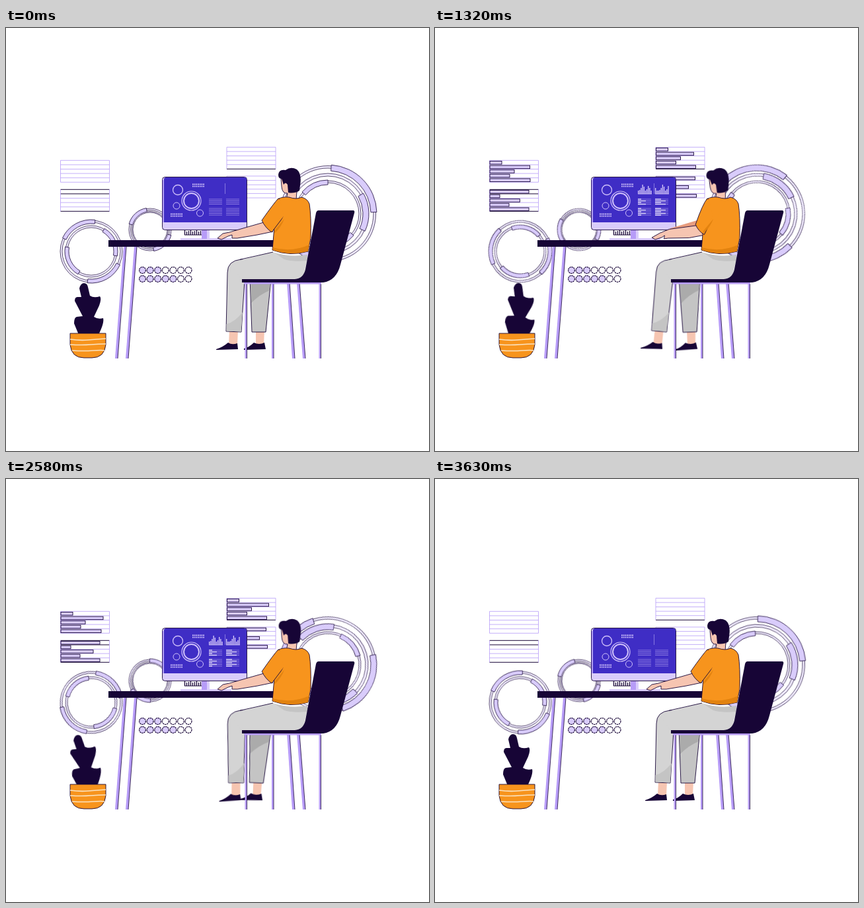
Animation, 640 px wide and 640 px high, one loop 3.66 s. Source, as an HTML page:

```html
<!DOCTYPE html>
<html lang="en">
<head>
<meta charset="utf-8">
<title>Working at the desk</title>
<style>
html, body { margin: 0; width: 100%; height: 100%; overflow: hidden; background: #fff; }
svg { display: block; width: 100vw; height: 100vh; }
.line { stroke: #170536; stroke-width: .9; }
.lilac { fill: #d9ccfb; }
.violet { fill: #b79cf8; }
.dark { fill: #170536; }
.skin { fill: #f6c5b1; }
.orange { fill: #f7941d; }
.shade { fill: #e2820f; }
.spin, .sway, .front, .rear, .head, .arm, .far, .sleeve {
  animation: 3660ms ease-in-out infinite;
}
.spin { animation-name: spin; animation-timing-function: linear; }
.sway { animation-name: sway; transform-origin: 125px 475px; }
.front { animation-name: front; transform-origin: 352px 362px; }
.rear { animation-name: rear; transform-origin: 386px 380px; }
.head { animation-name: head; transform-origin: 433px 256px; }
.arm { animation-name: arm; }
.far { animation-name: far; }
.sleeve { animation-name: sleeve; }
@keyframes spin { to { transform: rotate(360deg); } }
@keyframes sway {
  0%, 100% { transform: rotate(0deg); }
  25% { transform: rotate(7deg); }
  75% { transform: rotate(-6.5deg); }
}
@keyframes front {
  0%, 100% { transform: rotate(0deg); }
  25% { transform: rotate(6deg); }
  49% { transform: rotate(-.4deg); }
  75% { transform: rotate(-2.2deg); }
}
@keyframes rear {
  0%, 100% { transform: rotate(0deg); }
  25% { transform: rotate(-4.4deg); }
  49% { transform: rotate(.5deg); }
  75% { transform: rotate(2.8deg); }
}
@keyframes head {
  0%, 100% { transform: rotate(0deg); }
  25% { transform: rotate(-3deg); }
  75% { transform: rotate(1deg); }
}
@keyframes arm {
  0%, 75%, 100% { d: path("M390 294L338 309L328 311L320 318L326 320L336 315L342 313L342 318L350 318L380 313L404 308Z"); }
  25% { d: path("M399 299L356 304L342 310L329 317L334 320L344 317L348 314L347 319L353 318L385 318L407 314Z"); }
}
@keyframes far {
  0%, 75%, 100% { d: path("M392 294L350 306L352 308L400 300Z"); }
  25% { d: path("M399 290L356 303L358 306L404 300Z"); }
}
@keyframes sleeve {
  0%, 75%, 100% { d: path("M412 258Q406 264 387 291Q392 302 402 309L421 284L428 264Z"); }
  25% { d: path("M412 258Q405 266 395 298Q399 308 408 313L420 288L428 264Z"); }
}
</style>
</head>
<body>
<svg viewBox="0 0 640 640">
  <g id="rings" fill="none"></g>
  <g id="panels"></g>
  <g id="dots"></g>

  <g id="table"></g>
  <path class="dark" d="M155 321H408V331H155Z"/>

  <path class="sway dark" d="M110 464L103 447Q103 438 107 437L116 436L104 413Q104 407 108 407L114 407L111 394Q113 386 118 386Q123 386 124 392L127 405Q133 409 142 406Q145 409 141 420L133 437Q139 441 147 439Q149 446 140 464Z"/>
  <path class="orange line" d="M97 462H151V479Q149 499 130 499H118Q99 499 97 479Z"/>
  <path d="M97 471Q112 473 124 472T151 470M97 479Q115 480 128 479T151 478M100 488Q118 489 132 488T149 488" fill="none" stroke="#fbe3c0" stroke-width="1.7"/>

  <g id="keys"></g>
  <path class="lilac" d="M264 318H341V321H264Z"/>
  <path class="violet" d="M296 305H308V319H296Z"/>
  <path class="lilac" d="M304 305H308V319H304Z"/>
  <rect class="lilac line" x="236.5" y="225.5" width="128" height="80" rx="4"/>
  <path d="M239 294V229Q239 226 242 226H361Q364 226 364 229V294Z" fill="#3f2dc5"/>
  <path d="M237.5 230V294" stroke="#8d75ea" stroke-width="1.5"/>
  <g id="screen" stroke="#cfc0fa" fill="none"></g>

  <g class="rear">
    <path class="skin" d="M378 457H391L390 479H378Z"/>
    <path class="dark" d="M360 485Q368 483 375 476Q383 480 391 476L393 486L360 487Z"/>
    <path class="line" d="M369 378H401L400 390L393 460H372Z" fill="#c4c4c4"/>
    <path d="M370 378H400L399 397Q384 403 371 416Z" fill="#ababab"/>
  </g>
  <g class="front">
    <path class="skin" d="M338 457H351L350 479H337Z"/>
    <path class="dark" d="M318 486Q328 483 336 476Q342 480 350 477L351 486L318 487Z"/>
    <path class="line" d="M335 370Q335 352 356 350L372 352V381H361L356 460L333 459Z" fill="#d4d4d4"/>
    <path d="M333.5 448Q346 445 358 430L355.7 459.5L333.5 458.5Z" fill="#c4c4c4"/>
  </g>
  <path d="M403 339Q430 347 447 346L456 350L450 375L440 382H357L346 366Q345 352 357 350.5Z" fill="#d4d4d4"/>
  <path d="M354 350.3Q378 345 404 339" class="line" fill="none"/>
  <path d="M406 340Q430 347 456 343V352Q434 354 421 350Z" fill="#c4c4c4"/>

  <g id="legs"></g>
  <path class="violet" d="M360 384H477V387.5H360Z"/>
  <path class="dark" d="M473 276H526Q528 277 527 280L506 358Q500 382 480 385H357V380H437Q450 379 453 365L469 280Q470 276 473 276Z"/>

  <g class="head">
    <path class="skin line" d="M416 228L426 228L430 247H440L439 260H424L426 250Q418 251 417 240Z"/>
    <path class="dark" d="M412 222Q413 213 423 215Q431 209 440 214Q447 220 445.500 234L444 246Q436 251 427 249L426 237Q423 232 420 237L417 228Q412 228 412 222Z"/>
  </g>

  <path class="far" d="M392 294L350 306L352 308L400 300Z" fill="#e79c7e"/>
  <path class="arm skin line" d="M390 294L338 309L328 311L320 318L326 320L336 315L342 313L342 318L350 318L380 313L404 308Z"/>
  <path class="orange line" d="M411 259Q418 255 428 256Q440 260 447 256Q456 258 459 266Q462 285 461 318L457 338Q430 346 403 336L406 300Z"/>
  <path class="shade" d="M403.500 332Q432 340 459 328L457 338Q430 345 403.500 336Z"/>
  <path class="sleeve orange line" d="M412 258Q406 264 387 291Q392 302 402 309L421 284L428 264Z"/>
  <path class="orange" d="M414 258Q430 254 440 262L424 294L410 305L420 284Z"/>
  <path class="shade" d="M421 289L406 307L406 311Q416 302 421 289Z"/>
</svg>
<script>
const LOOP = 3660, INK = '#170536', LILAC = '#d9ccfb', VIOLET = '#b79cf8';
const $ = id => document.getElementById(id);

function add(parent, tag, attrs) {
  const el = document.createElementNS('http://www.w3.org/2000/svg', tag);
  for (const k in attrs) el.setAttribute(k, attrs[k]);
  return parent.appendChild(el);
}

// Grow to `size` after `start`, hold, then shrink before the loop ends.
function grow(el, prop, size, start, dur = 920) {
  const back = 3050 + start * .2;
  const at = (ms, v) => ({ offset: ms / LOOP, [prop]: v });
  const none = prop === 'width' ? '0px' : 'scaleY(0)';
  const full = prop === 'width' ? size + 'px' : 'scaleY(1)';
  const hidden = { visibility: 'hidden' }, shown = { visibility: 'visible' };
  el.animate([
    { ...at(0, none), ...hidden }, { ...at(start, none), ...hidden },
    { ...at(start + 1, none), ...shown }, { ...at(start + dur, full), ...shown },
    { ...at(back, full), ...shown }, { ...at(back + 450, none), ...hidden },
    { ...at(LOOP, none), ...hidden }
  ], { duration: LOOP, iterations: Infinity });
}

function sector(g, r1, r2, from, sweep) {
  const pt = (r, a) => [r * Math.cos(a * Math.PI / 180), r * Math.sin(a * Math.PI / 180)].map(v => v.toFixed(2));
  const to = from + sweep;
  add(g, 'path', {
    d: `M${pt(r2, from)}A${r2} ${r2} 0 0 1 ${pt(r2, to)}L${pt(r1, to)}A${r1} ${r1} 0 0 0 ${pt(r1, from)}Z`,
    fill: LILAC, stroke: INK, 'stroke-width': .8
  });
}

// Each band: thin inner and outer radius, thick inner and outer radius, start angle, sweep.
function ring(x, y, bands) {
  const g = add(add($('rings'), 'g', { transform: `translate(${x} ${y})` }), 'g', { class: 'spin' });
  for (const [a, b, c, d, from, sweep] of bands) {
    add(g, 'circle', { r: (a + b) / 2, stroke: '#f1ecfe', 'stroke-width': b - a });
    for (const r of [a, b]) add(g, 'circle', { r, stroke: INK, 'stroke-width': .7 });
    if (sweep) for (const turn of [0, 180]) sector(g, c, d, from + turn, sweep);
  }
}
ring(487, 281, [[69, 72.5, 65, 74, -86, 84], [57, 61, 53, 62, -30, 55], [47, 50, 44, 51, 40, 50]]);
ring(129, 338, [[44, 47, 42, 48, -155, 72], [36, 39, 34, 40, -60, 70]]);
ring(218, 305, [[29.5, 32, 27, 33, -165, 65], [26, 27.5]]);

function panel(x, y, edge, sizes, starts) {
  const g = $('panels'), step = 6.6;
  for (let i = 0; i < 6; i++)
    add(g, 'path', { d: `M${x} ${y + i * step}h74`, stroke: edge.includes(i) ? INK : '#c4b0f9', 'stroke-width': 1 });
  add(g, 'path', { d: `M${x} ${y}v33m74 0v-33`, stroke: VIOLET, 'stroke-width': .8 });
  sizes.forEach((w, i) => grow(add(g, 'rect', {
    x: x + .5, y: y + i * step + 1.2, width: 0, height: 4.6, class: 'lilac line'
  }), 'width', w, starts[i]));
}
panel(82.5, 200.3, [], [18, 64, 37, 30, 61], [265, 450, 50, 300, 225]);
panel(82.5, 244.3, [0, 1, 5], [59, 15, 49, 29, 59], [236, 200, 470, 400, 330]);
panel(334, 180.3, [5], [18, 63, 37, 30, 60], [220, 490, 380, 200, 340]);
panel(334, 224, [], [59, 15, 49, 29, 61], [270, 300, 310, 400, 150]);

[3, 5].forEach((filled, row) => {
  for (let i = 0; i < 7; i++) add($('dots'), 'circle', {
    cx: 206.5 + i * 11.6, cy: 366.5 + row * 13, r: 4.9, fill: i < filled ? LILAC : '#fff',
    stroke: INK, 'stroke-width': 1.2, 'stroke-dasharray': '2.4 .8'
  });
});

function post(g, x1, y1, x2, w) {
  add(g, 'path', { d: `M${x1} ${y1}L${x2} 500h${w}L${x1 + w} ${y1}Z`, fill: VIOLET });
  add(g, 'path', { d: `M${x1 + w} ${y1}L${x2 + w} 500`, stroke: INK, 'stroke-width': .8 });
}
post($('table'), 178, 331, 165, 4);
post($('table'), 194, 331, 181, 4);
post($('table'), 425, 385, 433, 4);
post($('table'), 440, 385, 449, 4);
for (const x of [361.5, 402, 473.5]) post($('legs'), x, 386, x, 3);

for (let i = 0; i < 9; i++)
  add($('keys'), 'path', { d: `M${270.5 + i * 3} ${306 + i * 5 % 3}V313`, stroke: INK, 'stroke-width': 1.3 });
add($('keys'), 'path', { d: 'M270 313H296', stroke: INK, 'stroke-width': 1 });

// Dashboard on the monitor.
const screen = $('screen');
for (const [cx, cy, r, w] of [[260, 245, 7.5, 1.3], [280.5, 261.5, 14.5, 1.2], [280.5, 261.5, 11.5, 2], [258, 269, 5, 1], [293.5, 280, 5, 1]])
  add(screen, 'circle', { cx, cy, r, 'stroke-width': w });
for (const [x, y] of [[282, 236.5], [282, 239.7], [249, 281.5], [249, 284.7]])
  add(screen, 'path', { d: `M${x} ${y}h18`, 'stroke-width': 1.8, 'stroke-dasharray': '1.8 .9' });
add(screen, 'path', { d: 'M331.500 235V251', 'stroke-width': .5 });

for (const [col, x] of [307, 333].entries()) {
  for (let i = 0; i < 9; i++) {
    const y = 259 + i * 2.5 + (i > 3 ? 4 : 0);
    add(screen, 'path', { d: `M${x} ${y}h20`, 'stroke-width': .7, opacity: .75 });
    grow(add(screen, 'rect', { x, y: y - .6, height: 1.3, width: 0, fill: '#efe8ff', stroke: 'none' }),
      'width', 5 + (i * 7 + col * 4) % 14, 230 + i * 37 % 160);
  }
  for (let i = 0; i < 10; i++) {
    const h = 2 + [3, 4, 7, 12, 9, 3, 5, 10, 7, 3][(i + col * 8) % 10];
    const bar = add(screen, 'rect', { x: x + i * 2.15, y: 251 - h, width: 1.3, height: h, fill: LILAC, stroke: 'none' });
    bar.style.transformOrigin = '0 251px';
    grow(bar, 'transform', h, 180 + i * 53 % 170, 750);
  }
  grow(add(screen, 'rect', { x, y: 250.6, width: 0, height: .8, fill: LILAC, stroke: 'none' }), 'width', 21, 100, 300);
}
</script>
</body>
</html>
```
